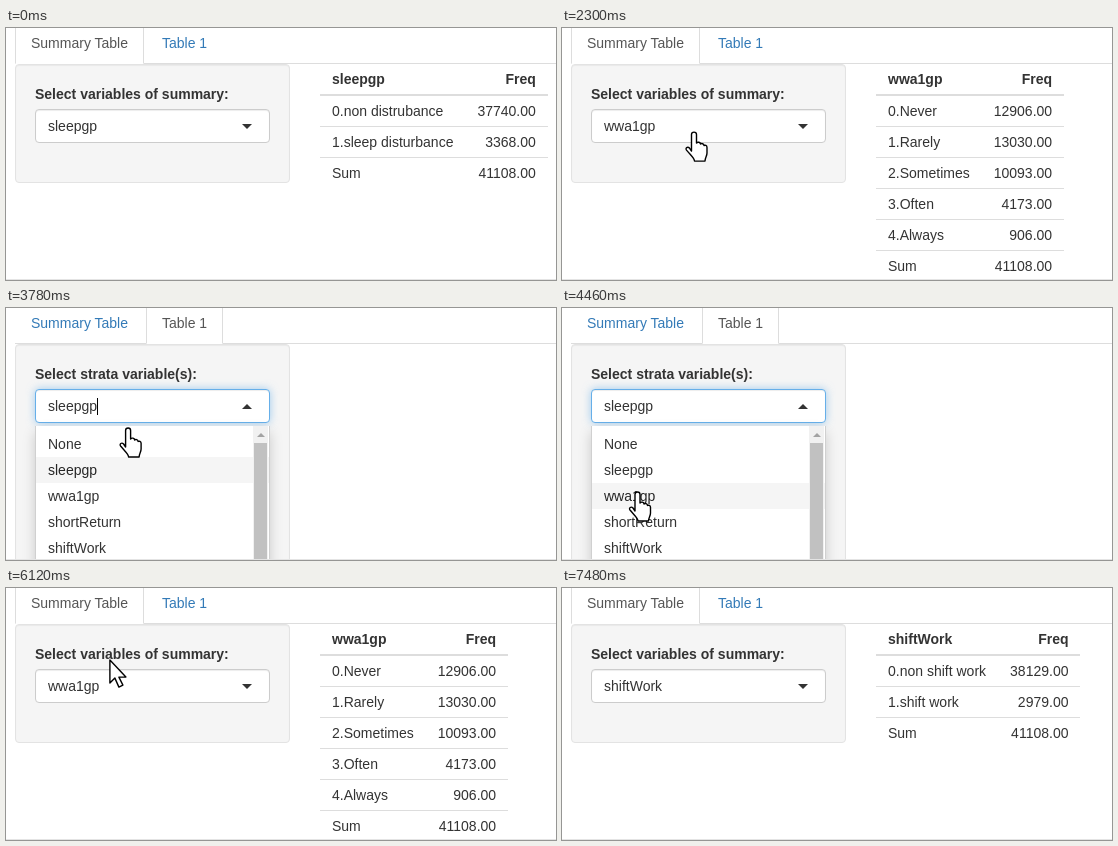
These frames come from a looping animation (550x252 px, 8.3 s). An HTML page:

```html
<!DOCTYPE html>
<html lang="en">
<head>
<meta charset="utf-8">
<title>Summary table demo</title>
<style>
html, body { margin: 0; width: 100%; height: 100%; overflow: hidden; background: #fff; }
* { box-sizing: border-box; }
#stage { position: relative; width: 550px; height: 252px; overflow: hidden; isolation: isolate; background: #fff;
  font: 14px/20px "Liberation Sans", Arial, sans-serif; color: #333; white-space: nowrap; }
#stage > *, .field, .field > * { position: absolute; }
.rule { left: 9px; top: 35px; width: 541px; height: 1px; background: #ddd; }
.edge { left: 0; top: 251px; width: 550px; height: 1px; background: #e4e4e4; }
.tabs { left: 9px; top: -6px; display: flex; gap: 2px; }
.tab { height: 42px; padding: 10px 15px; border: 1px solid transparent; border-radius: 4px 4px 0 0; color: #337ab7; }
.tab.hover { background: #eee; border-color: #eee #eee #ddd; color: #23527c; }
.tab.on { background: #fff; border-color: #ddd #ddd #fff; color: #555; }
.well { left: 9px; top: 36px; width: 275px; background: #f5f5f5; border: 1px solid #e3e3e3; border-radius: 4px;
  box-shadow: inset 0 1px 1px rgba(0,0,0,.05); }
.field { left: 19px; width: 235px; }
.field b { left: 0; top: 0; }
.box { top: 25px; width: 235px; height: 34px; padding: 6px 12px; background: #fff; border: 1px solid #ccc;
  border-radius: 4px; box-shadow: inset 0 1px 1px rgba(0,0,0,.075); }
.box.open { border-color: #66afe9; box-shadow: inset 0 1px 1px rgba(0,0,0,.075), 0 0 8px rgba(102,175,233,.6); }
.arrow { position: absolute; right: 17px; top: 14px; border: solid transparent; border-width: 5px 5px 0; border-top-color: #333; }
.open .arrow { border-width: 0 5px 5px; border-bottom-color: #333; }
.caret { display: inline-block; width: 1px; height: 17px; background: #000; vertical-align: -4px; }
.chip { position: absolute; left: 9px; top: 4px; padding: 0 3px; height: 21px; line-height: 18px; background: #efefef; border-radius: 3px; }
.menu { left: 29px; top: 118px; width: 235px; height: 200px; padding: 5px 0; background: #fff;
  border: solid #d0d0d0; border-width: 0 1px; box-shadow: 0 6px 12px rgba(0,0,0,.175); }
.menu div { height: 26px; padding: 3px 12px; }
.menu .on { background: #f5f5f5; color: #262626; }
.bar { position: absolute; right: 1px; top: 0; width: 15px; height: 200px; background: #f1f1f1; }
.bar::before { content: ""; position: absolute; left: 4px; top: 7px; border: solid transparent; border-width: 0 4px 4px; border-bottom-color: #a3a3a3; }
.bar::after { content: ""; position: absolute; left: 1px; top: 17px; width: 13px; height: 183px; background: #c1c1c1; }
table { left: 314px; top: 36px; border-spacing: 0; }
th, td { padding: 5px 12px; text-align: left; }
th { border-bottom: 2px solid #ddd; }
tr + tr + tr td { border-top: 1px solid #ddd; }
th + th, td + td { text-align: right; }
.spot { width: 36px; height: 36px; margin: -18px; border-radius: 50%; background: #fff04a; mix-blend-mode: multiply; }
svg { left: 0; top: 0; }
svg path { fill: #fff; stroke: #000; stroke-width: 1.4; stroke-linejoin: round; }
svg .ibeam { fill: none; stroke-width: 2; }
</style>
</head>
<body>
<div id="stage"></div>
<script>
const LOOP = 8300;
const names = ['sleepgp', 'wwa1gp', 'shortReturn', 'shiftWork', 'njob'];
const data = {
  sleepgp: [['0.non distrubance', 37740], ['1.sleep disturbance', 3368]],
  wwa1gp: [['0.Never', 12906], ['1.Rarely', 13030], ['2.Sometimes', 10093], ['3.Often', 4173], ['4.Always', 906]],
  shiftWork: [['0.non shift work', 38129], ['1.shift work', 2979]]
};

// State changes: time, patch
const events = [
  [0, { tab: 0, value: 'sleepgp', table: 'sleepgp', strata: 'sleepgp', open: false }],
  [1370, { open: true }],
  [1930, { open: false, value: 'wwa1gp' }],
  [2040, { table: 'wwa1gp' }],
  [2780, { tab: 1 }],
  [3600, { open: true }],
  [4640, { open: false, strata: 'wwa1gp' }],
  [5660, { tab: 0 }],
  [6350, { open: true }],
  [6990, { open: false, value: 'shiftWork' }],
  [7100, { table: 'shiftWork' }]
];
const clicks = [[1300, 1370], [1870, 1930], [2730, 2830], [3540, 3600], [4580, 4640], [5510, 5660], [6290, 6350], [6930, 6990]];

// Pointer path: time, x, y
const path = [
  [760, 395, 244], [1130, 150, 96], [1300, 137, 105], [1424, 137, 107], [1590, 96, 165], [1640, 98, 168], [1670, 101, 173],
  [1960, 101, 173], [2600, 172, 20], [2680, 174, 18],
  [3070, 174, 18], [3480, 142, 98], [3640, 138, 104], [3880, 110, 135], [4300, 78, 180], [4428, 76, 185],
  [4650, 76, 185], [4740, 78, 170], [5320, 77, 23],
  [5890, 77, 23], [6240, 118, 98], [6500, 112, 108], [6635, 97, 170], [6692, 72, 210], [6750, 75, 213],
  [7040, 75, 213], [7480, 150, 262]
];
// Moving spans with their step counts: start, end, steps
const spans = [
  [760, 1590, 16], [1640, 1670, 2], [1870, 2680, 14], [2730, 2880, 3], [3070, 3880, 16],
  [3930, 4740, 14], [4790, 5320, 12], [5890, 6750, 16], [6930, 7480, 10]
];

const field = (top, label, body, id = '') =>
  `<div class="field" style="top:${top}px"><b>${label}</b><div class="box" id="${id}">${body}</div></div>`;
const select = '<span class="text"></span><i class="caret"></i><i class="arrow"></i>';

const stage = document.getElementById('stage');
stage.innerHTML = `
  <div class="rule"></div>
  <div class="tabs"><div class="tab">Summary Table</div><div class="tab">Table 1</div></div>
  <div class="well" style="height:119px">${field(19, 'Select variables of summary:', select, 'summary')}</div>
  <div class="well" style="height:300px">
    ${field(19, 'Select strata variable(s):', select, 'strata')}
    ${field(98, 'Select categorical variable(s):', '')}
    ${field(177, 'Select continuous variable(s):', '<span class="chip">AGE</span>')}
  </div>
  ${Object.entries(data).map(([name, rows]) => tableHtml(name, rows)).join('')}
  <div class="menu"></div>
  <div class="edge"></div>
  <div class="spot"></div>
  <svg width="550" height="252"><g>
    <path class="arrow-shape" d="M0 0V23l5-5 4 9 4-2-4-8h7z"/>
    <path class="hand" d="M-3 18V1.5a2.5 2.5 0 0 1 5 0V10c1-1.5 4-1 4 1c1-1 3.5-.5 3.5 1.5c1-.7 3-.2 3 1.8V20c0 3-2 5-2 8H0c0-3-4-6-8-11c-1.5-2 1-4 3-2z"/>
    <path class="ibeam" d="M-7-11H-2L0-9 2-11H7M0-9V9M-7 11H-2L0 9 2 11H7"/>
  </g></svg>`;

function tableHtml(name, rows) {
  const all = [...rows, ['Sum', rows.reduce((sum, row) => sum + row[1], 0)]];
  const body = all.map(([label, n]) => `<tr><td>${label}</td><td>${n.toFixed(2)}</td></tr>`).join('');
  return `<table data-name="${name}"><tr><th>${name}</th><th>Freq</th></tr>${body}</table>`;
}

const $ = s => stage.querySelector(s);
const $$ = s => [...stage.querySelectorAll(s)];
const show = (el, on) => { el.style.visibility = on ? 'visible' : 'hidden'; };
const tabs = $$('.tab'), wells = $$('.well'), boxes = [$('#summary'), $('#strata')], tables = $$('table');
const menu = $('.menu'), spot = $('.spot'), pointer = $('svg g');
const shapes = { arrow: $('.arrow-shape'), hand: $('.hand'), ibeam: $('.ibeam') };

function stepped(t) {
  const span = spans.filter(s => s[0] <= t).pop();
  if (!span) return t;
  const [start, end, n] = span, step = (end - start) / (n - 1);
  return start + Math.min(n - 1, Math.floor((t - start) / step)) * step;
}

function pointerAt(t) {
  const q = stepped(t);
  const i = path.findIndex(p => p[0] > q);
  if (i < 0) return path[path.length - 1].slice(1);
  if (i === 0) return path[0].slice(1);
  const [t0, x0, y0] = path[i - 1], [t1, x1, y1] = path[i], k = (q - t0) / (t1 - t0);
  return [x0 + (x1 - x0) * k, y0 + (y1 - y0) * k];
}

const tabUnder = (x, y) => y > 35 ? -1 : x >= 9 && x < 138 ? 0 : x >= 140 && x < 217 ? 1 : -1;
const inField = x => x > 29 && x < 264;

function shapeFor(x, y, state) {
  const tab = tabUnder(x, y);
  if (tab >= 0) return tab === state.tab ? 'arrow' : 'hand';
  if (inField(x) && y > 81 && y < 115) return state.open ? 'ibeam' : 'hand';
  return state.open && inField(x) && y > 118 ? 'hand' : 'arrow';
}

let menuKey = '';
function drawMenu(state, t) {
  show(menu, state.open);
  if (!state.open) return;
  const options = state.tab ? ['None', ...names] : names;
  const [x, y] = pointerAt(t - 57);   // hover trails the pointer by one step
  const row = inField(x) && y >= 123 ? Math.floor((y - 123) / 26)
    : options.indexOf(state.tab ? state.strata : 'sleepgp');
  const key = state.tab + ':' + row;
  if (key === menuKey) return;
  menuKey = key;
  menu.innerHTML = options.map((name, i) => `<div class="${i === row ? 'on' : ''}">${name}</div>`).join('') + '<i class="bar"></i>';
}

function render(t) {
  const past = events.filter(e => e[0] <= t);
  const state = Object.assign({}, ...past.map(e => e[1]));
  const since = t - past[past.length - 1][0];
  const visible = t >= 760 && t < 7480;
  const [x, y] = pointerAt(t), over = visible ? tabUnder(x, y) : -1;

  tabs.forEach((tab, i) => { tab.className = 'tab' + (i === state.tab ? ' on' : i === over ? ' hover' : ''); });
  wells.forEach((well, i) => { well.style.display = i === state.tab ? '' : 'none'; });
  boxes.forEach((box, i) => {
    box.classList.toggle('open', state.open);
    box.querySelector('.text').textContent = i ? state.strata : state.value;
    show(box.querySelector('.caret'), state.open && i === state.tab && since % 1060 < 530);
  });
  tables.forEach(el => show(el, state.tab === 0 && el.dataset.name === state.table));
  drawMenu(state, t);

  const shape = shapeFor(x, y, state);
  for (const name in shapes) show(shapes[name], visible && name === shape);
  pointer.setAttribute('transform', `translate(${x.toFixed(1)} ${y.toFixed(1)})`);
  show(spot, clicks.some(([a, b]) => t >= a && t < b));
  spot.style.left = x + 'px';
  spot.style.top = y + 'px';
}

const begin = performance.now();
function tick() {
  render((performance.now() - begin) % LOOP);
  requestAnimationFrame(tick);
}
tick();
</script>
</body>
</html>
```
